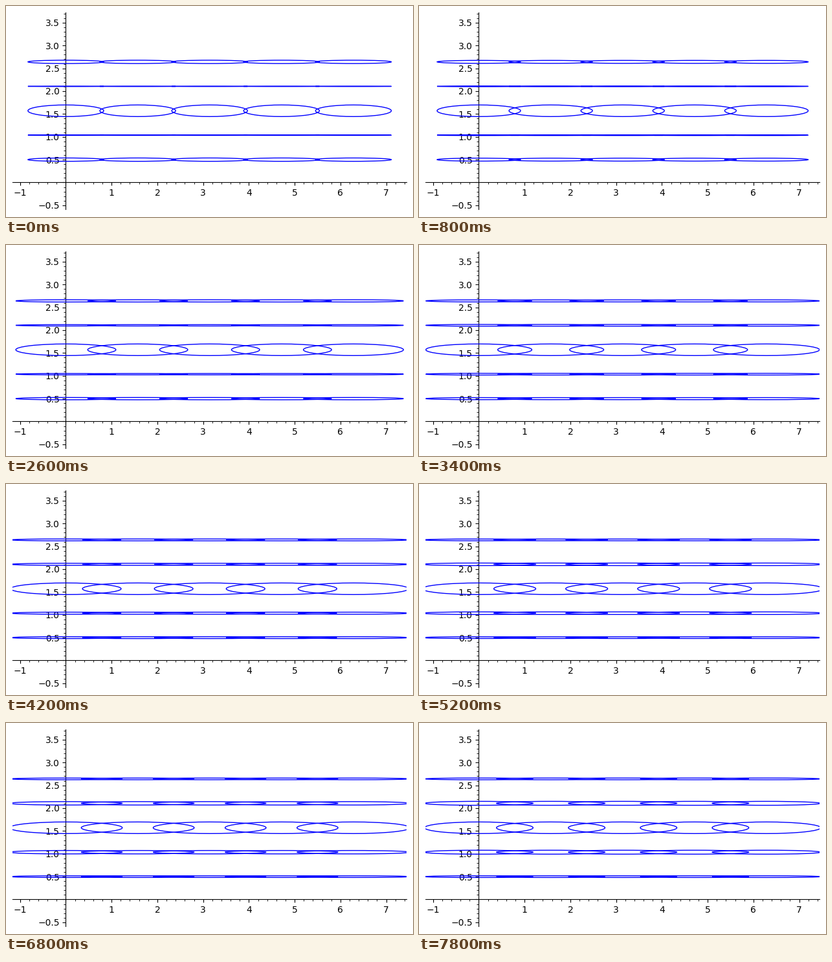
Animation, 629 px wide and 327 px high, one loop 8000 ms. Source, as a matplotlib script:

```python
import numpy as np
import matplotlib.pyplot as plt
from matplotlib.animation import FuncAnimation
from matplotlib.patches import Ellipse
from matplotlib.ticker import AutoMinorLocator, FuncFormatter, MultipleLocator

W, H, DPI = 629, 327, 100
FRAMES, STEP = 40, 200
SCALE = 70.74          # pixels per data unit
LEFT, TOP = 10, 10     # margins in pixels

plt.rcParams["font.family"] = "DejaVu Sans"


def padded(lo, hi):
    pad = 0.02 * (hi - lo)
    return lo - pad, hi + pad


def label(v, fmt):
    return "" if abs(v) < 1e-9 else format(v, fmt).replace("-", "\u2212")


xlim = padded(-1, 2 * np.pi + 1)
ylim = padded(-0.5, np.pi + 0.5)
w, h = (xlim[1] - xlim[0]) * SCALE, (ylim[1] - ylim[0]) * SCALE

fig = plt.figure(figsize=(W / DPI, H / DPI), dpi=DPI, facecolor="white")
ax = fig.add_axes([LEFT / W, 1 - (TOP + h) / H, w / W, h / H])
ax.set(xlim=xlim, ylim=ylim)

for side in ("left", "bottom"):
    ax.spines[side].set_position("zero")
for side in ("right", "top"):
    ax.spines[side].set_visible(False)

for axis, step, fmt in ((ax.xaxis, 1, ".0f"), (ax.yaxis, 0.5, ".1f")):
    axis.set_major_locator(MultipleLocator(step))
    axis.set_minor_locator(AutoMinorLocator(5))
    axis.set_major_formatter(FuncFormatter(lambda v, _, fmt=fmt: label(v, fmt)))

cols = np.linspace(0, 2 * np.pi, 5)
rows = np.linspace(0.5, np.pi - 0.5, 5)
rings = []
for i, y in enumerate(rows):
    for x in cols:
        ring = Ellipse((x, y), 1, 1, fill=False, edgecolor="blue", lw=1, zorder=5)
        rings.append((abs(i - 2), ax.add_patch(ring)))


def radii(n):
    """Half width shared by all rings, half heights by distance from the middle row."""
    a = 0.912 + 0.338 * np.cos(2 * np.pi * (n - 29) / 100)
    inner = (0.3 + 0.055 * n + 0.0004 * n * n) / SCALE
    outer = (1.3 + 1.3 * (1 - n / 33) ** 2) / SCALE
    return a, (0.127, inner, outer)


def draw(n):
    a, heights = radii(n)
    for kind, ring in rings:
        ring.set_width(2 * a)
        ring.set_height(2 * heights[kind])
    return [ring for _, ring in rings]


anim = FuncAnimation(fig, draw, frames=FRAMES, interval=STEP, repeat=True, repeat_delay=0)
plt.show()
```
